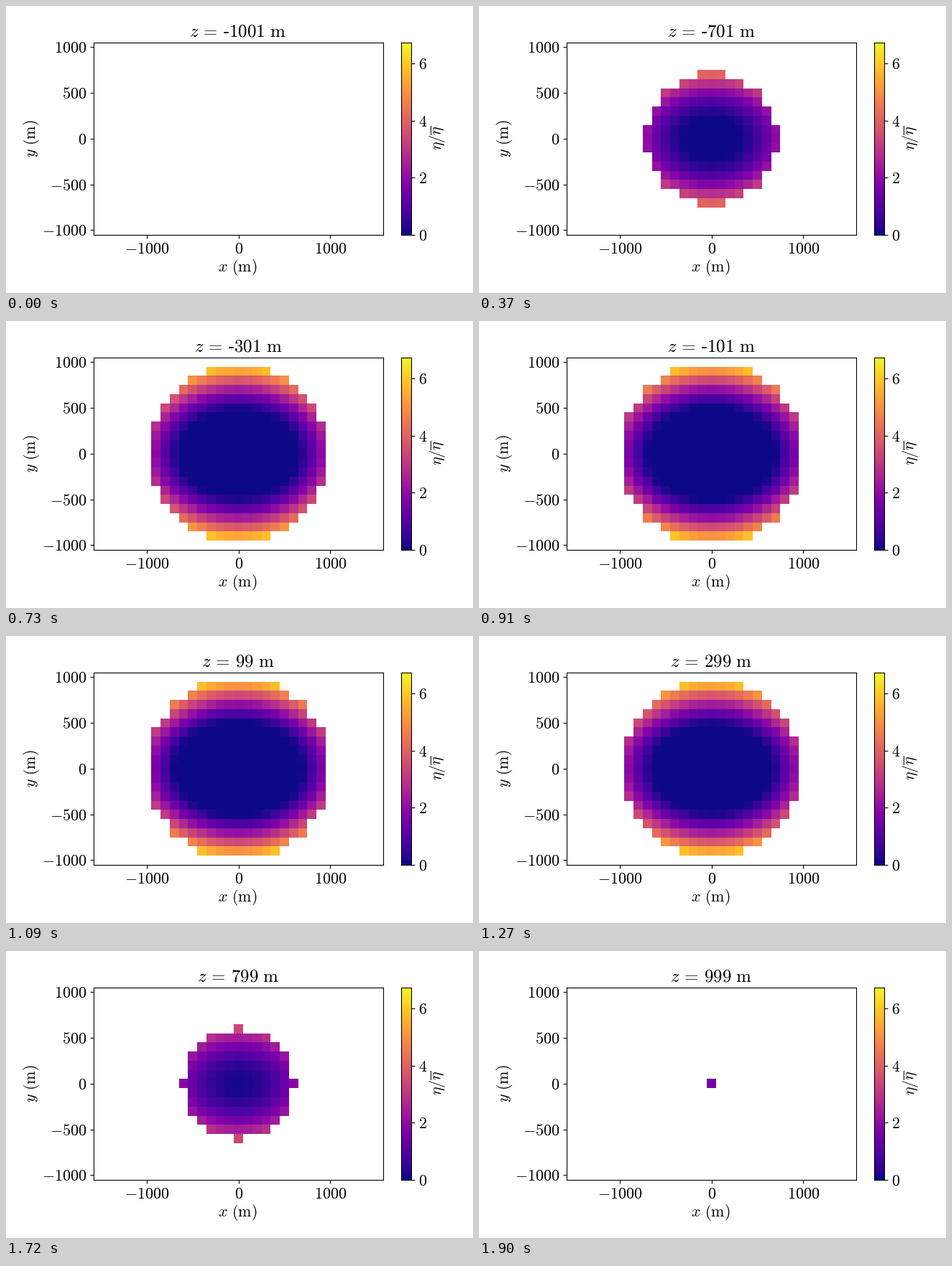
A matplotlib script that plays this animation: 650 by 400 pixels, repeating every 1.99 s.

```python
import numpy as np
import matplotlib.pyplot as plt
from matplotlib.animation import FuncAnimation

W, H, DPI = 650, 400, 100
RADIUS, STEP = 1000, 100
TICK_SIZE, TITLE_SIZE = 15.9, 18
V_MAX = 6.73
TOP, BOTTOM = 50.87, 318.87

plt.rcParams.update({"mathtext.fontset": "cm", "axes.linewidth": 0.8})

fig = plt.figure(figsize=(W / DPI, H / DPI), dpi=DPI, facecolor="white")


def px_axes(left, right):
    return fig.add_axes([left / W, 1 - BOTTOM / H,
                         (right - left) / W, (BOTTOM - TOP) / H])


def px_text(x, y, text, size=TICK_SIZE, rotation=0):
    return fig.text(x / W, 1 - y / H, text, size=size, rotation=rotation,
                    ha="center", va="baseline", rotation_mode="anchor")


def set_ticks(axis, values):
    axis.set_ticks(values, [f"${v}$" for v in values], fontsize=TICK_SIZE)


def density(x, y, z):
    """Relative density: a quadric with a soft floor at zero, inside the ball."""
    q = (5.1 * x**2 + 9.33 * y**2 + 4.1 * z**2) / RADIUS**2 - 2.6
    value = (q + np.sqrt(q**2 + 0.02)) / 2
    return np.ma.masked_where(x**2 + y**2 + z**2 > RADIUS**2, value)


def title(z):
    sign = r"\text{-}" if z < 0 else ""
    return rf"$z\,=\,{sign}{abs(z)}\ \mathrm{{m}}$"


# Slice plane
grid = np.arange(-RADIUS - 1, RADIUS, STEP)
edges = np.append(grid, grid[-1] + STEP) - STEP / 2
X, Y = np.meshgrid(grid, grid)

ax = px_axes(122.1, 525.1)
mesh = ax.pcolormesh(edges, edges, density(X, Y, grid[0]),
                     cmap="plasma", vmin=0, vmax=V_MAX)
ax.set_xlim(-1579, 1577)
ax.set_ylim(edges[0], edges[-1])
set_ticks(ax.xaxis, [-1000, 0, 1000])
set_ticks(ax.yaxis, [-1000, -500, 0, 500, 1000])

# Colour scale
bar = px_axes(550.4, 564.4)
bar.imshow(np.linspace(0, V_MAX, 256)[:, None], cmap="plasma", origin="lower",
           extent=(0, 1, 0, V_MAX), aspect="auto")
bar.set_xticks([])
bar.yaxis.tick_right()
set_ticks(bar.yaxis, [0, 2, 4, 6])

heading = px_text(322.9, 42.2, title(grid[0]), TITLE_SIZE)
px_text(322.4, 370, r"$x\ (\mathrm{m})$")
px_text(40.6, 185, r"$y\ (\mathrm{m})$", rotation=90)
px_text(606, 184, r"$\eta/\overline{\eta}$", rotation=90)

# Ticks of 10 ms: the first slice holds for 19, each later one for 9
FIRST, HOLD = 19, 9


def update(i):
    k = 0 if i < FIRST else 1 + (i - FIRST) // HOLD
    z = int(grid[k])
    mesh.set_array(density(X, Y, z))
    heading.set_text(title(z))
    return mesh, heading


anim = FuncAnimation(fig, update, frames=FIRST + HOLD * (len(grid) - 1),
                     interval=10, repeat=True)
plt.show()
```
